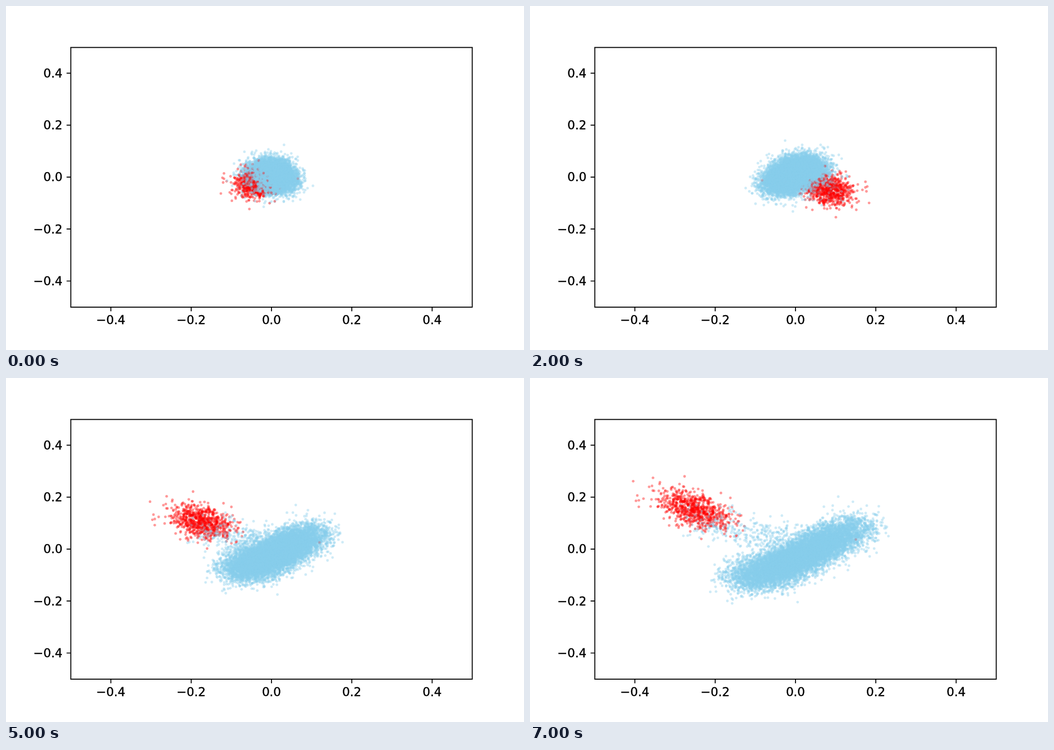
An HTML page with a canvas for the animation above (8 s loop, 917 by 611 pixels).

```html
<!DOCTYPE html>
<html lang="en">
<head>
<meta charset="utf-8">
<title>Scatter steps</title>
<style>
  html, body { margin: 0; width: 100%; height: 100%; overflow: hidden; background: #fff; }
  canvas, svg { position: absolute; left: 0; top: 0; }
  path { fill: none; stroke: #000; stroke-width: 1.7; }
  text { font: 21.2px "DejaVu Sans", sans-serif; stroke: #000; stroke-width: .4px; }
</style>
</head>
<body>
<canvas id="plot" width="917" height="611"></canvas>
<svg id="axes" width="917" height="611" viewBox="0 0 917 611">
  <path d="M114.7 73.6H825.4V534.8H114.7Z"/>
</svg>
<script>
const OX = 470, OY = 303.9, STEP = 1000, STEPS = 8;

// Axis ticks and labels
const axes = document.getElementById('axes');
function add(tag, attrs, text) {
  const el = document.createElementNS('http://www.w3.org/2000/svg', tag);
  for (const k in attrs) el.setAttribute(k, attrs[k]);
  if (text) el.textContent = text;
  axes.append(el);
}
for (let i = -2; i <= 2; i++) {
  const label = (i < 0 ? '\u2212' : '') + Math.abs(i * 0.2).toFixed(1);
  const x = OX + i * 142.2, y = OY - i * 92.3;
  add('path', { d: `M${x} 534.8v7.4M114.7 ${y}h-7.4` });
  add('text', { x, y: 565, 'text-anchor': 'middle' }, label);
  add('text', { x: 100, y: y + 7.5, 'text-anchor': 'end' }, label);
}

// Seeded random numbers
let seed = 20;
function rnd() {
  seed = (seed + 0x6D2B79F5) | 0;
  let t = Math.imul(seed ^ (seed >>> 15), 1 | seed);
  t = (t + Math.imul(t ^ (t >>> 7), 61 | t)) ^ t;
  return ((t ^ (t >>> 14)) >>> 0) / 4294967296;
}
const gauss = () => Math.sqrt(-2 * Math.log(1 - rnd())) * Math.cos(2 * Math.PI * rnd());

// Each point keeps its own random offsets through all steps
const points = Array.from({ length: 11000 }, () => {
  const r = rnd();
  return {
    place: r < .07 ? red : r < .1 ? trail : band,
    u: rnd(), v: rnd(), a: gauss(), b: gauss()
  };
});

// Positions around the centre; g is the growth, reaching 1 in the last step
const growth = k => (29 + 13 * k + 1.2 * k * k) / 179;
const noise = g => 12.3 + 3 * g;

function red({ a, b }, g) {
  const dx = a * (15 + 17 * g);
  return [-178 * g + dx, -70 * g + .3 * g * dx + b * noise(g)];
}

function trail({ u, a, b }, g) {
  const n = noise(g);
  return [-178 * g * (1 - u) + 1.5 * n * a, g * (-50 + 38 * u) + n * b];
}

function band({ u, v, a, b }, g) {
  const n = noise(g), t = 1.5 * (u - .5) + .9 * (v - .5);
  return [
    g * (8 + 104 * t) + 1.3 * n * a,
    g * (3 - 47 * Math.sin(1.235 * t - .235)) + n * b
  ];
}

const ctx = document.getElementById('plot').getContext('2d');

function draw(k) {
  const g = growth(k);
  const fx = k > 0 && k < 5 ? -1 : 1, fy = k < 5 ? -1 : 1;
  function dot([x, y], color) {
    ctx.fillStyle = color;
    ctx.beginPath();
    ctx.arc(OX + fx * x, OY + fy * y, 2.4, 0, 2 * Math.PI);
    ctx.fill();
  }
  ctx.clearRect(0, 0, 917, 611);
  for (const p of points) {
    dot(p.place(p, g), p.place === red ? 'rgba(255,0,0,.4)' : 'rgba(135,206,235,.4)');
  }
  // lone red point inside the blue band
  dot([35 + 72 * g, -17 * g], 'rgba(255,0,0,.2)');
}

let shown = -1;
function tick() {
  const k = Math.floor(performance.now() / STEP) % STEPS;
  if (k !== shown) draw(shown = k);
  requestAnimationFrame(tick);
}
tick();
</script>
</body>
</html>
```
